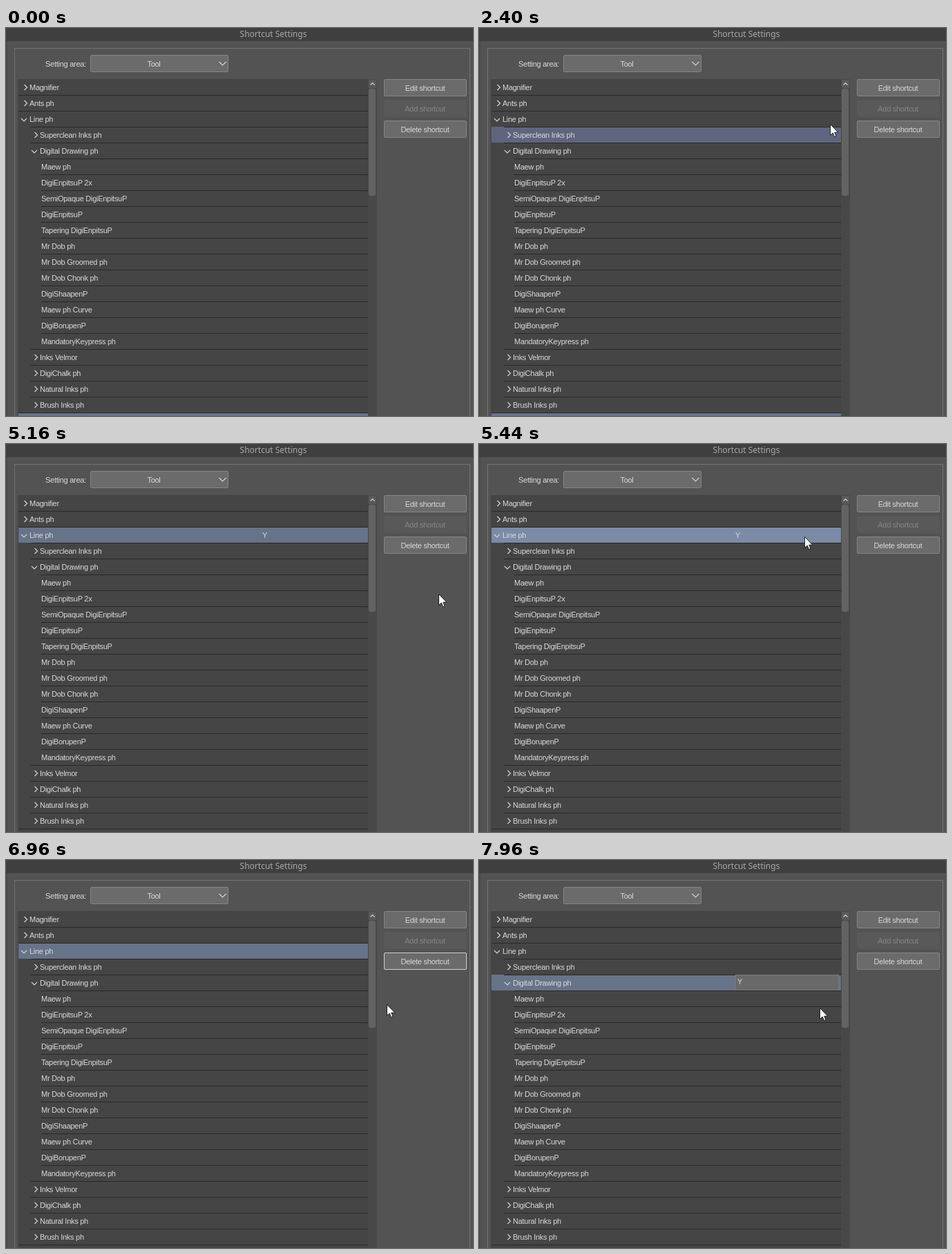
Write an HTML page that moves like this. It is 676 by 562 pixels and loops after 8 s.

```html
<!DOCTYPE html>
<html lang="en">
<head>
<meta charset="utf-8">
<title>Shortcut Settings</title>
<style>
  html, body { margin: 0; width: 100%; height: 100%; overflow: hidden; background: #535353; }
  svg { display: block; }
  text { font: 11px "Liberation Sans", Arial, sans-serif; letter-spacing: -.27px; fill: #dadada; }
  .title { font: 12px "Noto Sans", sans-serif; letter-spacing: 0; fill: #a9a9a9; }
  .mid { text-anchor: middle; }
  .off { fill: #868686; }
  .chevron { fill: none; stroke: #d4d4d4; stroke-width: 1.2; }
  .box { fill: #6b6b6b; stroke: #858585; }
</style>
</head>
<body>
<svg id="stage" width="676" height="562" viewBox="0 0 676 562"></svg>
<script>
const LOOP = 8000, STEP = 40;
const TOP = 74, ROW = 23, LEFT = 18, RIGHT = 524;
const SELECTED = '#677389', SELECTED_HOVER = '#7b8aa6', HOVER = '#60657f';

// Each row: depth, label, arrow ('>' closed, 'v' open)
const rows = [
  [0, 'Magnifier', '>'], [0, 'Ants ph', '>'], [0, 'Line ph', 'v'],
  [1, 'Superclean Inks ph', '>'], [1, 'Digital Drawing ph', 'v'],
  ...['Maew ph', 'DigiEnpitsuP 2x', 'SemiOpaque DigiEnpitsuP', 'DigiEnpitsuP',
    'Tapering DigiEnpitsuP', 'Mr Dob ph', 'Mr Dob Groomed ph', 'Mr Dob Chonk ph',
    'DigiShaapenP', 'Maew ph Curve', 'DigiBorupenP', 'MandatoryKeypress ph'
  ].map(label => [2, label]),
  ...['Inks Velmor', 'DigiChalk ph', 'Natural Inks ph', 'Brush Inks ph'].map(label => [1, label, '>']),
  [0, '']
];
const textX = [34, 49, 51], lineX = [LEFT, 36, 51];
const LINE_ROW = 2, DRAWING_ROW = 4, LAST_ROW = 21;

// Pointer paths: time, x, y; hidden outside each path
const paths = [
  [[1480, 670, 311], [1800, 572, 215], [2280, 511, 150], [2400, 508, 139], [2600, 505, 129],
   [3000, 505, 129], [3360, 638, 230], [3399, 638, 230]],
  [[5080, 670, 251], [5280, 560, 165], [5440, 471, 134], [5560, 474, 133], [5880, 620, 140],
   [6240, 620, 140], [6360, 580, 205], [6440, 522, 305], [6520, 465, 530], [6559, 465, 530]],
  [[6720, 670, 307], [6880, 575, 225], [7120, 504, 176], [7560, 504, 176], [7960, 493, 214], [8000, 493, 214]]
];

const rect = (x, y, w, h, attrs) => `<rect x="${x}" y="${y}" width="${w}" height="${h}" ${attrs}/>`;
const text = (x, y, label, cls = '', id = '') => `<text x="${x}" y="${y}" class="${cls}" id="${id}">${label}</text>`;
const chevron = (x, y, d) => `<path class="chevron" d="M${x} ${y}${d}"/>`;
const button = (y, label, id = '') =>
  rect(547.5, y + .5, 119, 24, `rx="1.5" class="box" id="${id}"`) + text(606.5, y + 17, label, 'mid');
const rowTop = i => TOP + ROW * i;

function drawRow([depth, label, arrow], i) {
  const y = rowTop(i), x = textX[depth];
  const line = i ? rect(lineX[depth], y, RIGHT - lineX[depth], 1, 'fill="#292929"') : '';
  const mark = arrow === '>' ? chevron(x - 7.5, y + 8, 'l4 4 -4 4')
    : arrow === 'v' ? chevron(x - 12, y + 11, 'l4 4 4 -4') : '';
  return rect(LEFT, y, RIGHT - LEFT, ROW, `rx="1" fill="none" class="row"`) + line + mark + text(x, y + 16, label);
}

const stage = document.getElementById('stage');
stage.innerHTML =
  rect(0, 0, 676, 562, 'fill="#535353"') +
  rect(0, 19, 2, 543, 'fill="#494949"') +
  rect(0, 0, 676, 19, 'fill="#3f3f3f"') +
  text(387, 13, 'Shortcut Settings', 'title mid') +
  rect(12.5, 29.5, 659, 560, 'fill="none" stroke="#747474"') +
  text(57, 56, 'Setting area:') +
  rect(122.5, 39.5, 199, 24, 'rx="1.5" class="box"') +
  text(214, 56, 'Tool', 'mid') +
  chevron(308.5, 49, 'l5 5 5 -5') +
  rect(17, TOP, 520, 488, 'fill="#454545"') +
  rows.map(drawRow).join('') +
  rect(RIGHT, TOP, 13, 488, 'fill="#484848"') +
  rect(525, 75, 11, 12, 'fill="#595959"') +
  chevron(527.5, 82.5, 'l3 -3 3 3') +
  rect(525, 88, 10, 155, 'rx="3" fill="#636363"') +
  button(74, 'Edit shortcut') +
  rect(547, 104, 120, 25, 'rx="2" fill="#595959"') + text(606.5, 121, 'Add shortcut', 'mid off') +
  button(134, 'Delete shortcut', 'delete') +
  rect(371.5, 0, 149, 22, 'id="field" fill="#696969" stroke="#787878"') +
  text(371, 0, 'Y', '', 'key') +
  '<path id="pointer" d="M.5 .5V16.5L4.2 13 6.6 18.6 9 17.6 6.7 12.2H11.8Z" fill="#fff" stroke="#111" stroke-width=".9"/>';

const [del, field, key, pointer] = ['delete', 'field', 'key', 'pointer'].map(id => document.getElementById(id));
const rowBoxes = [...stage.querySelectorAll('.row')];
const show = (el, on) => el.setAttribute('visibility', on ? 'visible' : 'hidden');
const within = (t, from, to) => t >= from && t < to;

function pointerAt(t) {
  const path = paths.find(p => t >= p[0][0] && t <= p[p.length - 1][0]);
  if (!path) return null;
  const n = Math.max(1, path.findIndex(k => k[0] >= t));
  const [t0, x0, y0] = path[n - 1], [t1, x1, y1] = path[n];
  const f = (t - t0) / (t1 - t0);
  return [Math.round(x0 + (x1 - x0) * f), Math.round(y0 + (y1 - y0) * f)];
}

function render(now) {
  const t = Math.floor(now % LOOP / STEP) * STEP;
  const selected = t < 2800 ? LAST_ROW : t < 7280 ? LINE_ROW : DRAWING_ROW;
  const editing = within(t, 2880, 3640) || t >= 7400;
  const typed = within(t, 3120, 3640) || t >= 7680;
  const assigned = within(t, 3760, 6040);

  const at = pointerAt(t);
  show(pointer, at);
  if (at) pointer.setAttribute('transform', `translate(${at})`);

  // Hover highlights follow the pointer one step late
  const over = at && pointerAt(t - STEP);
  const overList = over && !editing && over[0] < 522;
  const hovered = overList ? Math.floor((over[1] - TOP) / ROW) : -1;
  rowBoxes.forEach((box, i) => box.setAttribute('fill',
    i === selected ? (i === hovered ? SELECTED_HOVER : SELECTED) : i === hovered ? HOVER : 'none'));

  const overDelete = over && within(over[0], 547, 667) && within(over[1], 134, 159);
  del.style.fill = overDelete ? '#7a7a7a' : '';
  del.style.stroke = within(t, 5880, 7280) ? '#d0d0d0' : '';

  show(field, editing);
  field.setAttribute('y', rowTop(selected) + .5);
  show(key, typed || assigned);
  key.setAttribute('x', editing ? 374 : 371);
  key.setAttribute('y', rowTop(selected) + (editing ? 14 : 16));
}

const start = performance.now();
function tick() {
  render(performance.now() - start);
  requestAnimationFrame(tick);
}
tick();
</script>
</body>
</html>
```
